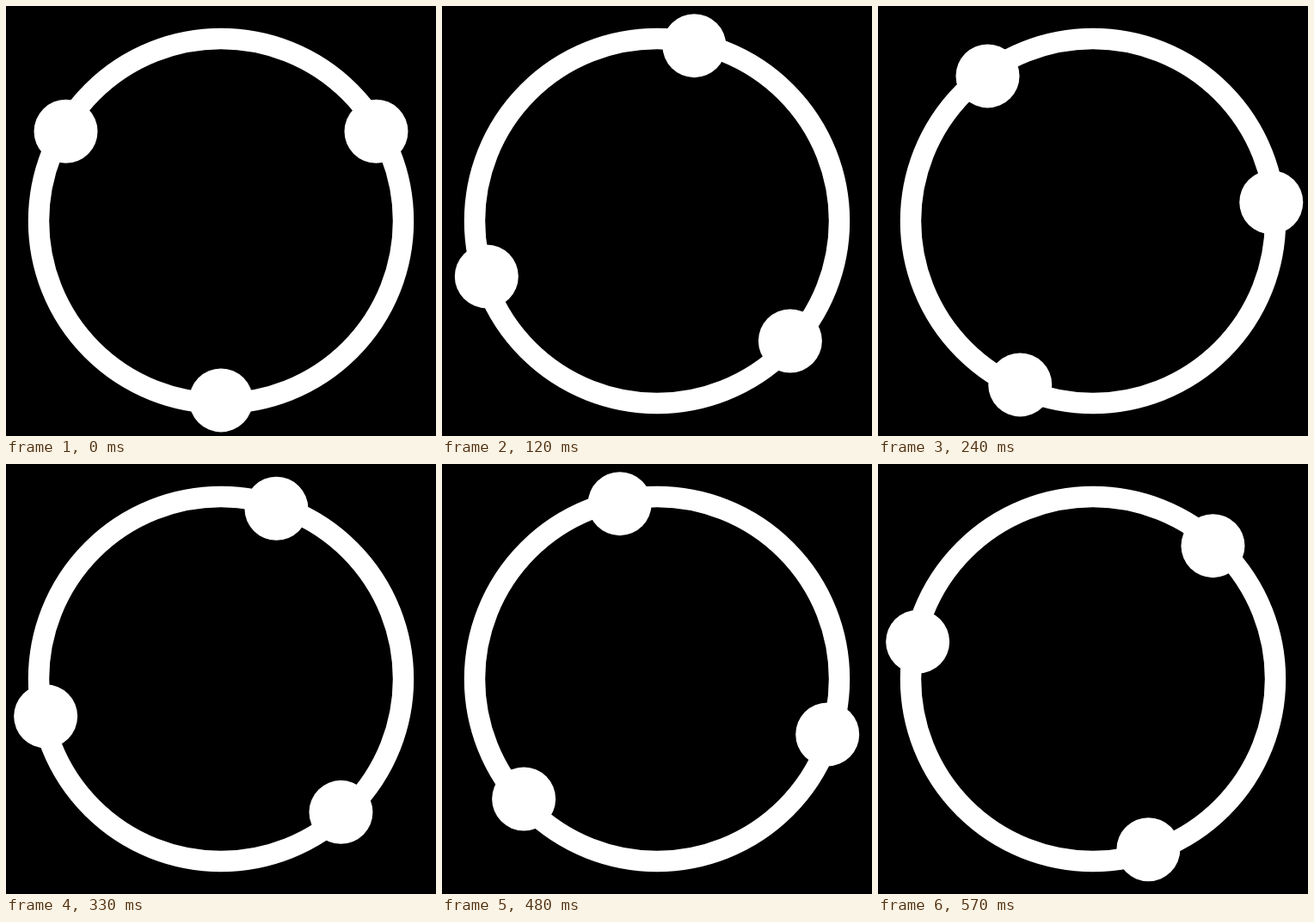
These frames come from a looping animation (500 px wide and 500 px high, 600 ms). An HTML page:

```html
<!DOCTYPE html>
<html lang="en">
<head>
<meta charset="utf-8">
<title>Orbit loader</title>
<style>
  html, body { margin: 0; width: 100%; height: 100%; overflow: hidden; background: #000; }
  svg { display: block; width: 100%; height: 100%; }
</style>
</head>
<body>
<svg viewBox="0 0 500 500">
  <circle cx="250" cy="250" r="212" fill="none" stroke="#fff" stroke-width="24.4"/>
  <g id="dots" fill="#fff"></g>
</svg>
<script>
  const LOOP = 600, STEP = 30;
  const CENTER = 250, ORBIT = 208.4, DOT_RADIUS = 37;
  const group = document.getElementById('dots');

  const dots = [90, 210, 330].map(angle => {
    const node = document.createElementNS('http://www.w3.org/2000/svg', 'circle');
    node.setAttribute('r', DOT_RADIUS);
    group.appendChild(node);
    return { node, angle };
  });

  // One clockwise turn per loop, advancing in discrete steps.
  function render(time) {
    const turn = Math.floor((time % LOOP) / STEP) * STEP / LOOP * 360;
    for (const { node, angle } of dots) {
      const a = (angle + turn) * Math.PI / 180;
      node.setAttribute('cx', CENTER + ORBIT * Math.cos(a));
      node.setAttribute('cy', CENTER + ORBIT * Math.sin(a));
    }
  }

  const start = performance.now();
  function tick() {
    render(performance.now() - start);
    requestAnimationFrame(tick);
  }
  render(0);
  requestAnimationFrame(tick);
</script>
</body>
</html>
```
